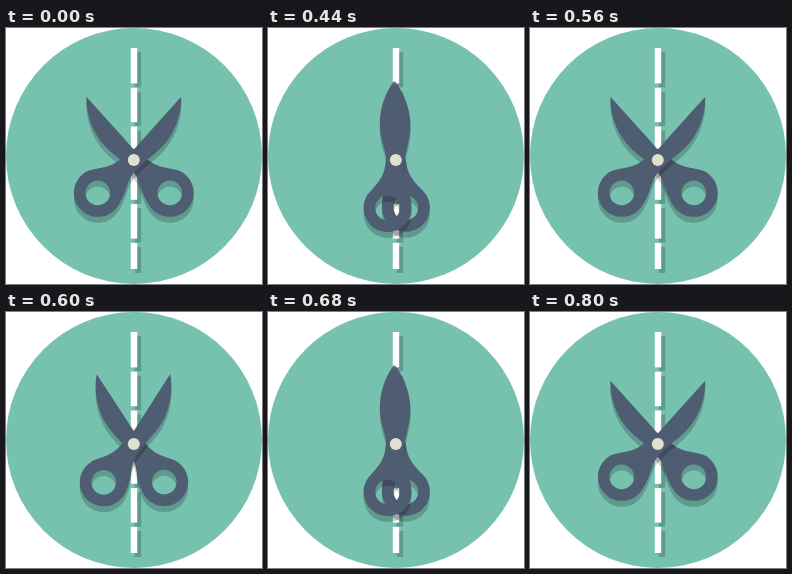
An HTML page with a canvas for the animation above (1.4 s loop, 256 by 256 pixels).

```html
<!DOCTYPE html>
<html>
<head>
<meta charset="utf-8">
<style>
  html, body { margin: 0; height: 100%; overflow: hidden; background: #fff; }
  canvas { display: block; width: 256px; height: 256px; }
</style>
</head>
<body>
<canvas id="stage"></canvas>
<script>
const LOOP = 1400, STEP = 40, PHASE = 120;
const SNIPS = [320, 560];
const RAD = Math.PI / 180;
const OPEN = 35.6 * RAD;
const OVERLAP = 2.2 * RAD; // the upper half closes a little further
const PIVOT = { x: 127.8, y: 132 };
const SHADOW = 'rgba(0, 0, 0, .2)';

const canvas = document.getElementById('stage');
const ctx = canvas.getContext('2d');
const ratio = window.devicePixelRatio || 1;
canvas.width = canvas.height = 256 * ratio;

// One half of the scissors, upright, with the pivot at the origin.
const half = new Path2D(
  'M-1.8 -79 C-11 -67 -16 -51 -16 -36 C-16 -22 -11 -12 -9 0 ' +
  'C-8 6 -7 10 -7.5 15 C-8 24 -13.9 32 -13.9 47.7 ' +
  'A24 24 0 1 0 27.1 30.7 C20 23.6 12 16 10.5 3 ' +
  'C10 -2 8 -6 6 -10 Q1 -55 -1.8 -79 Z ' +
  'M22.4 47.7 A12.3 12.3 0 1 1 -2.2 47.7 A12.3 12.3 0 1 1 22.4 47.7 Z');

const easeInOut = t => (1 - Math.cos(Math.PI * t)) / 2;
const easeOut = t => 1 - Math.pow(1 - t, 3.7);
const mix = (a, b, t) => a + (b - a) * t;

function openness(time) {
  for (const start of SNIPS) {
    const t = (time - start) / PHASE;
    if (t >= 0 && t < 1) return 1 - easeInOut(t);
    if (t >= 1 && t < 2) return easeOut(t - 1);
  }
  return 1;
}

function disc(x, y, r, color) {
  ctx.fillStyle = color;
  ctx.beginPath();
  ctx.arc(x, y, r, 0, Math.PI * 2);
  ctx.fill();
}

function dashes(dx, dy, color) {
  const period = 38.8, gap = 4.3, bottom = 241;
  ctx.fillStyle = color;
  for (let end = 55.4, top = 20; top < bottom; end += period) {
    ctx.fillRect(124.8 + dx, top + dy, 6.4, Math.min(end, bottom) - top);
    top = end + gap;
  }
}

function fillHalf(side, angle, dy, color) {
  ctx.save();
  ctx.translate(PIVOT.x, PIVOT.y + dy);
  ctx.scale(side, 1);
  ctx.rotate(-angle);
  ctx.fillStyle = color;
  ctx.fill(half, 'evenodd');
  ctx.restore();
}

function drawHalf(side, angle) {
  fillHalf(side, angle, 6, SHADOW);
  fillHalf(side, angle, 0, '#4f5d73');
}

function draw(time) {
  const open = openness(time);
  ctx.setTransform(ratio, 0, 0, ratio, 0, 0);
  ctx.fillStyle = '#fff';
  ctx.fillRect(0, 0, 256, 256);
  disc(128, 128, 128, '#76c2af');
  dashes(4, 4, SHADOW);
  dashes(0, 0, '#fff');
  drawHalf(1, mix(0, OPEN, open));
  drawHalf(-1, mix(-OVERLAP, OPEN, open));
  disc(PIVOT.x, PIVOT.y, 6, '#e0e0d1');
}

const origin = performance.now();
function tick() {
  const time = (performance.now() - origin) % LOOP;
  draw(Math.floor(time / STEP) * STEP);
  requestAnimationFrame(tick);
}
tick();
</script>
</body>
</html>
```
